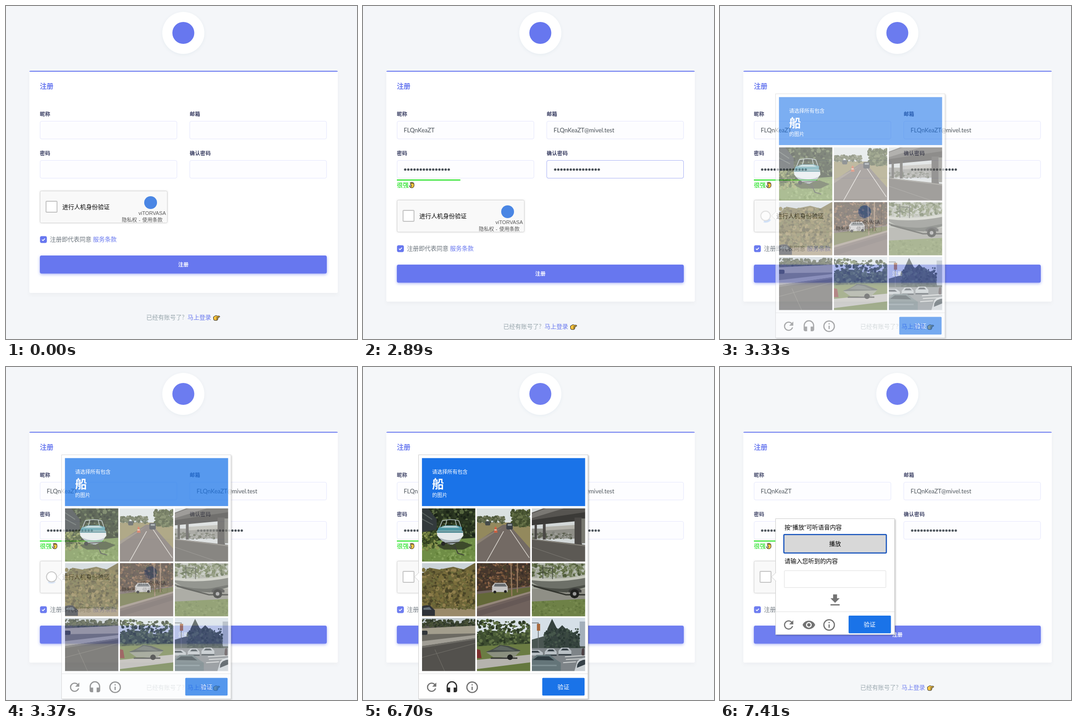
Recreate the animation shown at these times as an HTML page. Size 767x730 px, loop 8000 ms.

```html
<!DOCTYPE html>
<html lang="zh-CN">
<head>
<meta charset="utf-8">
<title>注册</title>
<style>
html, body { margin: 0; width: 100%; height: 100%; overflow: hidden; background: #f4f6f9; }
svg { display: block; }
text { font: 12.95px Lato, "Noto Sans CJK SC", "Noto Sans CJK", sans-serif; fill: #6c757d; white-space: pre; }
.title { font-size: 14.8px; font-weight: 700; fill: #6777ef; }
.label { font-size: 11.1px; font-weight: 700; letter-spacing: .46px; fill: #34395e; }
.value { fill: #495057; }
.small { font: 11.1px "Liberation Sans", "Noto Sans CJK SC", "Noto Sans CJK", sans-serif; fill: #555; }
.link { fill: #6777ef; }
.dark { fill: #000; }
.white { fill: #fff; }
.mid { text-anchor: middle; }
.input { fill: #fdfdff; stroke: #e4e6fc; }
.dots { stroke: #495057; stroke-width: 5.2; stroke-linecap: round; stroke-dasharray: 0 6.8; }
.icon { fill: #737373; }
.blue { fill: #1a73e8; }
.popup { fill: #fff; stroke: #ccc; filter: drop-shadow(2px 2px 1.5px rgba(0,0,0,.2)); }
.hand { fill: #ffc83d; stroke: #111; stroke-width: 1; stroke-linejoin: round; stroke-linecap: round; }
.photo { filter: blur(.5px); }

/* One 8 s cycle: 1 % = 80 ms */
.name, .mail, .pass, .again, .caret, .low, .card, .cover, .phones, .images, .audio {
  animation: 8s step-end infinite;
}
.focus, .box, .spin, .arc, .fade, .leave, .enter { animation: 8s linear infinite; }
.name { animation-name: name; }
.mail { animation-name: mail; }
.pass { animation-name: pass; }
.again { animation-name: again; }
.caret { animation-name: caret; }
.low { animation-name: low; }
.card { animation-name: card; }
.cover { animation-name: cover; }
.phones { animation-name: phones; }
.images { animation-name: images; }
.audio { animation-name: audio; }
.focus { animation-name: focus; }
.box { animation-name: box; transform-origin: 99.5px 440px; }
.spin { animation-name: spin; }
.arc { animation-name: arc; }
.fade { animation-name: fade; }
.leave { animation-name: leave; }
.enter { animation-name: enter; }

@keyframes name { 0% { opacity: 0 } 6.25%, 100% { opacity: 1 } }
@keyframes mail { 0% { opacity: 0 } 7%, 100% { opacity: 1 } }
@keyframes pass { 0% { opacity: 0 } 7.75%, 100% { opacity: 1 } }
@keyframes again { 0% { opacity: 0 } 8.5%, 100% { opacity: 1 } }
@keyframes low { 0% { transform: none } 7.75%, 100% { transform: translateY(20px) } }
@keyframes card { 0% { height: 487px } 7.75%, 100% { height: 506px } }
@keyframes caret {
  0% { opacity: 0 } 8.5% { opacity: 1 } 16.875% { opacity: 0 }
  27.25% { opacity: 1 } 29.375%, 100% { opacity: 0 }
}
@keyframes focus { 0%, 8.5% { opacity: 0 } 11.375%, 36.125% { opacity: 1 } 38.5%, 100% { opacity: 0 } }
@keyframes box {
  0%, 36.125% { transform: none; rx: 1.5px; opacity: 1 }
  37.5% { transform: scale(.7); rx: 12px; opacity: 1 }
  38% { transform: scale(.5); rx: 12px; opacity: 0 }
  41.2% { transform: scale(.8); rx: 12px; opacity: 0 }
  42%, 42.5% { transform: scale(.92); rx: 12px; opacity: 1 }
  44.125%, 100% { transform: none; rx: 1.5px; opacity: 1 }
}
@keyframes spin {
  0%, 37.2% { opacity: 0 } 38%, 39.9% { opacity: 1 }
  40.625% { opacity: .4 } 42.125% { opacity: .2 } 43%, 100% { opacity: 0 }
}
@keyframes arc { 0%, 37.5% { transform: rotate(-60deg) } 44.125%, 100% { transform: rotate(152deg) } }
@keyframes fade { 0%, 39.725% { opacity: 0 } 43.025%, 100% { opacity: 1 } }
@keyframes cover { 0% { opacity: 1 } 41.125%, 100% { opacity: 0 } }
@keyframes phones { 0% { fill: #737373 } 83.75%, 100% { fill: #2b2b2b } }
@keyframes images { 0% { opacity: 1 } 88.125%, 100% { opacity: 0 } }
@keyframes audio { 0% { opacity: 0 } 88.125%, 100% { opacity: 1 } }
@keyframes leave { 0%, 84.625% { opacity: 1 } 88.125%, 100% { opacity: .3 } }
@keyframes enter { 0%, 88.125% { opacity: .2 } 92%, 100% { opacity: 1 } }
</style>
</head>
<body>
<svg width="767" height="730" viewBox="0 0 767 730">
  <defs>
    <path id="refresh" d="M17.65 6.35A7.95 7.95 0 0 0 12 4a8 8 0 1 0 7.73 10h-2.08A6 6 0 1 1 12 6c1.66 0 3.14.69 4.22 1.78L13 11h7V4z"/>
    <path id="phones" d="M12 1a9 9 0 0 0-9 9v7c0 1.66 1.34 3 3 3h3v-8H5v-2a7 7 0 0 1 14 0v2h-4v8h3c1.66 0 3-1.34 3-3v-7a9 9 0 0 0-9-9z"/>
    <path id="info" fill-rule="evenodd" d="M11 7h2v2h-2zM11 11h2v6h-2zM12 2a10 10 0 1 0 0 20a10 10 0 1 0 0-20zM12 4a8 8 0 1 1 0 16a8 8 0 1 1 0-16z"/>
    <path id="eye" fill-rule="evenodd" d="M12 4.5C7 4.5 2.7 7.6 1 12c1.7 4.4 6 7.5 11 7.5s9.3-3.1 11-7.5c-1.7-4.4-6-7.5-11-7.5zM12 7a5 5 0 1 1 0 10a5 5 0 1 1 0-10zM12 9a3 3 0 1 0 0 6a3 3 0 1 0 0-6z"/>
    <path id="load" d="M19 9h-4V3H9v6H5l7 7zM5 18v2h14v-2z"/>
  </defs>

  <rect width="767" height="730" fill="#f4f6f9"/>
  <circle cx="387.5" cy="59" r="46" fill="#fff" style="filter:drop-shadow(0 2px 3px #e6ecf1)"/>
  <circle cx="387.5" cy="59" r="24" fill="#6777ef"/>

  <rect class="card" x="51" y="142" width="674" height="487" rx="3" fill="#fff" style="filter:drop-shadow(0 4px 4px rgba(0,0,0,.03))"/>
  <path d="M51 144a3 2 0 0 1 3-2h668a3 2 0 0 1 3 2z" fill="#6777ef"/>
  <text class="title" x="74" y="181">注册</text>

  <text class="label" x="74" y="240.8">昵称</text>
  <text class="label" x="401.5" y="240.8">邮箱</text>
  <text class="label" x="74" y="326.8">密码</text>
  <text class="label" x="401.5" y="326.8">确认密码</text>
  <g class="input">
    <rect x="74.5" y="252.5" width="299" height="39" rx="3.5"/>
    <rect x="401.5" y="252.5" width="299" height="39" rx="3.5"/>
    <rect x="74.5" y="338.5" width="299" height="39" rx="3.5"/>
    <rect x="401.5" y="338.5" width="299" height="39" rx="3.5"/>
  </g>
  <rect class="focus" x="401.5" y="338.5" width="299" height="39" rx="3.5" fill="none" stroke="#a9b2f5"/>
  <text class="value name" x="89" y="276.5">FLQnKeaZT</text>
  <text class="value mail" x="416.5" y="276.5">FLQnKeaZT@mivel.test</text>
  <g class="pass">
    <path class="dots" d="M92.2 358.5h95.3"/>
    <rect x="74" y="380.5" width="138.75" height="2" fill="#0d0"/>
    <text x="74" y="397.4" style="fill:#0d0">很强</text>
    <g class="hand">
      <path d="M104.5 391l-1.5-3.5q.6-1.5 1.8-.4l1.4 2.4l-.2-3q1-1.5 2 0l.8 3l.4-1.8q1.3-.8 1.7.5l.8 5q-.3 4.5-3.6 5.4q-4.6.6-6.4-2.4z"/>
      <circle cx="104" cy="394.4" r="2" fill="#fff"/>
    </g>
  </g>
  <path class="dots again" d="M420 358.5h95.3"/>
  <rect class="caret" x="517" y="349" width="1" height="17" fill="#495057"/>

  <g class="low">
    <rect x="74.5" y="405.5" width="278" height="70" rx="2.8" fill="#f9f9f9" stroke="#d3d3d3" style="filter:drop-shadow(0 0 2px rgba(0,0,0,.1))"/>
    <g class="spin">
      <g transform="translate(99.5 440)">
        <path class="arc" d="M10.65-7.46A13 13 0 0 1 10.65 7.46" fill="none" stroke="#5a97f2" stroke-width="4"/>
      </g>
    </g>
    <rect class="box" x="87.5" y="428" width="24" height="24" rx="1.5" fill="#fff" stroke="#c1c1c1" stroke-width="2"/>
    <text class="dark" x="123" y="445">进行人机身份验证</text>
    <circle cx="316" cy="431" r="14" fill="#4a86e4"/>
    <text class="small" x="289.5" y="458">viTORVASA</text>
    <text class="small" x="253" y="472.6">隐私权</text>
    <text class="small" x="290" y="472.6">-</text>
    <text class="small" x="297.8" y="472.6">使用条款</text>

    <rect x="74.3" y="504.5" width="15" height="15" rx="3.7" fill="#6777ef"/>
    <path d="M78.6 512.2l2.2 2.2l4.3-4.5" fill="none" stroke="#fff" stroke-width="1.7"/>
    <text x="96" y="516.2">注册即代表同意</text>
    <text class="link" x="190" y="516.2">服务条款</text>

    <rect x="74" y="547" width="627" height="39.5" rx="3.7" fill="#6777ef" style="filter:drop-shadow(0 2px 3px #acb5f6)"/>
    <text class="label mid" x="387.8" y="571.2" style="fill:#fff">注册</text>

    <text x="306.5" y="686.7" style="fill:#98a6ad">已经有账号了?</text>
    <text class="link" x="396.5" y="686.7">马上登录</text>
    <g class="hand">
      <path d="M453.6 681.5l4.2-2.6q2-.8 4 .8h4.6q1.6 1.3 0 2.6h-3.4q1.2 1 .2 2.2q.6 1.4-.6 2.2q0 2-1.6 2.4h-5q-2.4-.2-2.4-2.2z"/>
      <path d="M459.5 682.3h3.4M459.5 684.6h3.4M459.5 686.8h2.8" stroke-width=".7"/>
    </g>
  </g>

  <rect class="fade" width="767" height="730" fill="#fff" fill-opacity=".05"/>

  <g class="fade">
    <g class="images">
      <rect class="popup" x="121.5" y="192.5" width="370" height="535"/>
      <g class="leave">
        <rect class="blue" x="128.8" y="199.7" width="356.6" height="105.2"/>
        <text class="white" x="151" y="233.7" style="font-size:11.1px">请选择所有包含</text>
        <text class="white" x="151" y="265.8" style="font-size:25.9px;font-weight:700">船</text>
        <text class="white" x="151" y="285" style="font-size:11.1px">的图片</text>

        <svg x="129" y="310" width="116.4" height="116.4" viewBox="0 0 116 116"><g class="photo">
          <path d="M-2-2h120v120H-2z" fill="#27321f"/>
          <g data-leaf="3 320 0 0 116 64 5" data-cols="#25301d #3a4a2a #56663f #1a2317 #2e3b24"/>
          <path d="M-2-2h14l20 26v22l-34 6z" fill="#333a3c"/>
          <path d="M-2 8l24 16M-2 22l26 14" stroke="#59625f" stroke-width="2"/>
          <path d="M-2 84l38-14l82-6v54H-2z" fill="#6f8d46"/>
          <g data-leaf="41 140 0 72 116 42 4" data-cols="#7b9a50 #628039 #6f8d46 #86a35a"/>
          <path d="M28 80l60-8l22 8l-20 10H48z" fill="#3d4a2b"/>
          <g data-leaf="8 120 0 52 34 38 5" data-cols="#6f7d3e #47592b #8c9650 #35441f"/>
          <path d="M38 42l6-15q20-5 36 0l5 14M54 25l-4 17M72 25l4 16" fill="none" stroke="#b9c6c4" stroke-width="1.5"/>
          <path d="M36 42l14-5h26l11 4v8H33z" fill="#4f97a3"/>
          <path d="M40 42l10-4h24l8 4z" fill="#b9d3d6"/>
          <path d="M32 49h57l1 10l-9 13l-15 7q-22-3-33-20z" fill="#e3e8ea"/>
          <path d="M32 50h57v3H33z" fill="#3f7f8a"/>
          <path d="M36 63q14 16 30 16l15-7l5-8q-24 12-50-1z" fill="#a9b4ba"/>
          <path d="M48 76l34-2M70 78l8 20l14 4M58 78l18 12" fill="none" stroke="#3c3f38" stroke-width="2"/>
          <circle cx="46" cy="77" r="4.5" fill="#262825"/>
        </g></svg>

        <svg x="249" y="310" width="116.4" height="116.4" viewBox="0 0 116 116"><g class="photo">
          <path d="M-2-2h120v34H-2z" fill="#d9e0e0"/>
          <path d="M-2 31h120v87H-2z" fill="#93895d"/>
          <g data-leaf="5 150 0 18 60 13 4" data-cols="#616a4c #4e583c #747a5c"/>
          <g data-leaf="9 260 76 4 42 34 5" data-cols="#56633b #414c2d #68734a #4b5734"/>
          <path d="M56 36h14l48 54v28H-2V74z" fill="#736a64"/>
          <path d="M57 40L-2 72v8z" fill="#8b8174"/>
          <path d="M58 50L21 116M72 46l42 62" stroke="#d4cfc8" stroke-width="1.6"/>
          <path d="M37 53l2-13h3l3 13z" fill="#cf6242"/>
          <path d="M38 47h5" stroke="#e8d8cd" stroke-width="2"/>
          <rect x="64" y="32" width="14" height="14" rx="3" fill="#3b4046"/>
          <rect x="67" y="34" width="9" height="4" fill="#8d9699"/>
          <rect x="18" y="28" width="11" height="9" rx="2" fill="#454b4b"/>
        </g></svg>

        <svg x="369" y="310" width="116.4" height="116.4" viewBox="0 0 116 116"><g class="photo">
          <path d="M-2-2h120v120H-2z" fill="#d3d8d8"/>
          <path d="M-2 44h120v22H-2z" fill="#8f8f88"/>
          <path d="M30 40l66-4v8l-66 4z" fill="#b3b2aa"/>
          <g data-leaf="6 110 0 54 92 12 4" data-cols="#65685a #82847c #545a49 #9a9b94"/>
          <path d="M-2 10L30-2h88v26L-2 36z" fill="#565450"/>
          <path d="M-2 12L36-2h40L-2 22z" fill="#7a7873"/>
          <path d="M-2 26l120-18v18L-2 37z" fill="#3b3a37"/>
          <path d="M93 20h16v64H93zM24 34h6v34h-6zM6 35h5v32H6z" fill="#4b4946"/>
          <path d="M108 22h10v54h-10z" fill="#77776f"/>
          <path d="M-2 66l120 14v38H-2z" fill="#5c5954"/>
          <path d="M-2 67l120 15" stroke="#85827a" stroke-width="2"/>
          <path d="M-2 84l100 34" stroke="#7b7872"/>
        </g></svg>

        <svg x="129" y="430" width="116.4" height="116.4" viewBox="0 0 116 116"><g class="photo">
          <path d="M-2-2h120v120H-2z" fill="#cbd3d8"/>
          <path d="M-2 26L16 10l22 4l30-6l22 6l28-16v120H-2z" fill="#6d6438"/>
          <g data-leaf="12 520 0 14 116 80 5" data-cols="#7b6f3c #5d5530 #8f7e4c #4a4527 #6c6a3a"/>
          <path d="M-2 101l120-5v22H-2z" fill="#9a8a6a"/>
          <g data-leaf="44 50 30 92 86 8 4" data-cols="#6c6a3a #7b7548 #565430"/>
          <path d="M-2 95q10-5 20-2l10 10v12H-2z" fill="#2f3238"/>
          <path d="M3 98l13-2l5 6H3z" fill="#69727a"/>
        </g></svg>

        <svg x="249" y="430" width="116.4" height="116.4" viewBox="0 0 116 116"><g class="photo">
          <path d="M-2-2h120v120H-2z" fill="#45362c"/>
          <g data-leaf="15 420 0 0 116 58 4" data-cols="#584330 #392e28 #74543a #463f2b #8d664a #4d3c2e"/>
          <path d="M-2 62l120-12v68H-2z" fill="#70625d"/>
          <path d="M-2 68l120-16v9L-2 96z" fill="#636838"/>
          <path d="M-2 95L118 61v4L-2 100z" fill="#95877a"/>
          <path d="M-2 106l120-36v10L-2 118z" fill="#665956"/>
          <path d="M33 50l6-7h23l5 8v12H33z" fill="#c4c3c3"/>
          <path d="M39 45h22l4 6H37z" fill="#666a6e"/>
          <circle cx="39" cy="63" r="3" fill="#222"/><circle cx="62" cy="62" r="3" fill="#222"/>
          <path d="M74-2l2 74M88-2v66" stroke="#977a60" stroke-width="2.5"/>
        </g></svg>

        <svg x="369" y="430" width="116.4" height="116.4" viewBox="0 0 116 116"><g class="photo">
          <path d="M-2-2h120v120H-2z" fill="#a3a79c"/>
          <g data-leaf="18 260 0 0 116 32 5" data-cols="#65724a #8b9476 #4f5c3b #b4baae #737f5c"/>
          <path d="M-2 74l120-8v52H-2z" fill="#6e8147"/>
          <g data-leaf="46 150 0 82 116 32 4" data-cols="#788b50 #62753e #6e8147"/>
          <path d="M-2 56h120v22L-2 84z" fill="#8f8f86"/>
          <path d="M-2 32q60 6 120-4v24l-42 12q-48-2-78-24z" fill="#6d7068"/>
          <path d="M-2 31q60 7 120-5v6Q58 44-2 37z" fill="#c3c5ba"/>
          <path d="M-2 45q40 14 80 10l40-8v5l-42 12q-48-2-78-16z" fill="#4c4f48"/>
          <path d="M4 50l70 19h44" fill="none" stroke="#33352f" stroke-width="3"/>
          <path d="M24 4v30M45 8v27M24 10l21 2" stroke="#464b40" stroke-width="1.5"/>
          <path d="M80 59q14-10 28 0v5H80z" fill="#393a38"/>
          <circle cx="93" cy="67" r="10" fill="#20211f"/><circle cx="93" cy="67" r="4" fill="#999"/>
        </g></svg>

        <svg x="129" y="550" width="116.4" height="116.4" viewBox="0 0 116 116"><g class="photo">
          <path d="M-2-2h120v120H-2z" fill="#53514d"/>
          <path d="M-2-2h120v14H-2z" fill="#c3cbd0"/>
          <g data-leaf="22 260 0 4 116 16 4" data-cols="#3a4330 #4a5339 #2e3728"/>
          <path d="M-2 23l120-6v18L-2 36z" fill="#a39e8d"/>
          <path d="M-2 36l120-2v7L-2 52z" fill="#6c6a62"/>
          <path d="M-2 51L118 37v7L-2 62z" fill="#a19e95"/>
          <path d="M-2 62L118 44v3L-2 66z" fill="#6d6b65"/>
          <path d="M-2 87l120-32M28 69l22 49" stroke="#73716a"/>
          <rect x="-2" y="28" width="14" height="9" rx="3" fill="#33373a"/>
        </g></svg>

        <svg x="249" y="550" width="116.4" height="116.4" viewBox="0 0 116 116"><g class="photo">
          <path d="M-2-2h120v120H-2z" fill="#d9e2e7"/>
          <path d="M-2 36q30-14 60-4t60-6v48H-2z" fill="#3f4f31"/>
          <g data-leaf="27 300 0 6 116 58 5" data-cols="#3d4c30 #4e6139 #2c3925 #627447"/>
          <path d="M-2 62l120-6v62H-2z" fill="#6b7c43"/>
          <path d="M-2 92l120-12v18L-2 116z" fill="#b5b3ad"/>
          <path d="M-2 112l120-15v21H-2z" fill="#65783e"/>
          <path d="M20 74q18-6 30-15l18 2l27 10l-9 8H28z" fill="#454c48"/>
          <path d="M34 70l18-9l14 3l18 8z" fill="#5f6761"/>
          <path d="M20 75l74-2l-13 13H36z" fill="#8b907f"/>
          <path d="M30 88h58" stroke="#383a37" stroke-width="3"/>
          <circle cx="72" cy="86" r="6" fill="#202220"/>
          <path d="M-2 68l9 2l3 18H-2z" fill="#7d302e"/>
        </g></svg>

        <svg x="369" y="550" width="116.4" height="116.4" viewBox="0 0 116 116"><g class="photo">
          <path d="M-2-2h120v120H-2z" fill="#d5dfe7"/>
          <path d="M-2 48l28-8h92v28H-2z" fill="#4a5652"/>
          <path d="M104 8h14v54h-14z" fill="#a3afba"/>
          <path d="M26 66l8-42L44 2l12 24l10-10l12 12l18 6l10 32z" fill="#36433f"/>
          <g data-leaf="31 200 28 24 76 40 4" data-cols="#34433d #46574b #293732 #3c4b42"/>
          <path d="M-2 66h120v52H-2z" fill="#7e8488"/>
          <path d="M-2 11h16v55" fill="none" stroke="#686e70" stroke-width="1.5"/>
          <rect x="11" y="13" width="7" height="15" fill="#a8683c"/>
          <g fill="#b9c0c5">
            <path d="M28 82v-8l6-7h14l6 7v8zM58 81v-9l6-7h16l6 7v9zM-2 82V70h18l8 6v6z"/>
          </g>
          <path d="M33 73l4-4h9l4 4zM63 71l4-4h10l4 4zM-2 72h15l5 4H-2zM29 80h25v3H29zM58 79h28v3H58z" fill="#343e44"/>
          <path d="M72 85l46-3M74 91l44-2M68 98l28-2" stroke="#cfd2d2" stroke-width="2"/>
          <path d="M-2 92l12-11h30l14 11l9 6v20H-2z" fill="#647579"/>
          <path d="M2 92l11-8h24l12 9z" fill="#2f3b41"/>
          <path d="M-2 104h56" stroke="#7f9094" stroke-width="3"/>
          <path d="M92 118l7-23q8-9 19-8v31z" fill="#c9cfd3"/>
          <path d="M99 102q4-10 19-11v10l-20 8z" fill="#354047"/>
          <path d="M108 78l1-9l3-4l2 4v13h-5z" fill="#4a3f42"/>
        </g></svg>

        <rect class="cover" x="128" y="326" width="358" height="342" fill="#fff"/>
        <path d="M122 672.5h369" stroke="#dfdfdf"/>
        <g class="icon">
          <use href="#refresh" transform="translate(134.6 686.6) scale(1.28)"/>
          <use class="phones" href="#phones" transform="translate(178.9 687.5) scale(1.28)"/>
          <use href="#info" transform="translate(223.1 686.6) scale(1.28)"/>
        </g>
        <rect class="blue" x="391.7" y="681.5" width="92.5" height="38.8" rx="1.8"/>
        <text class="white mid" x="438" y="705.8" style="font-weight:500">验证</text>
      </g>
    </g>

    <g class="audio">
      <rect class="popup" x="121.5" y="332.5" width="260" height="254"/>
      <g class="enter">
        <text class="dark" x="141" y="356" style="font-family:'Liberation Sans','Noto Sans CJK SC','Noto Sans CJK',sans-serif">按“播放”可听语音内容</text>
        <rect x="139.5" y="367.2" width="224" height="40.6" rx="2" fill="#d8d8d8" stroke="#1a56bd" stroke-width="2.5"/>
        <text class="dark mid" x="251.5" y="392.4">播放</text>
        <text class="dark" x="141" y="430">请输入您听到的内容</text>
        <rect x="140.5" y="446.5" width="222" height="37" rx="1.5" fill="#fff" stroke="#dfdfdf"/>
        <path d="M122 536.5h259" stroke="#dfdfdf"/>
        <g class="icon">
          <use href="#load" transform="translate(234.3 494.2) scale(1.43)"/>
          <use href="#refresh" transform="translate(134.6 550.1) scale(1.28)"/>
          <use href="#eye" transform="translate(179.2 550.3) scale(1.25)"/>
          <use href="#info" transform="translate(223.1 550.1) scale(1.28)"/>
        </g>
        <rect class="blue" x="281" y="545" width="92.5" height="38.8" rx="1.8"/>
        <text class="white mid" x="327" y="569.3" style="font-weight:500">验证</text>
      </g>
    </g>
    <path d="M122.5 450.5l-10 9.5l10 9.5" fill="#fff" stroke="#ccc"/>
  </g>
</svg>
<script>
// Scatter seeded blobs of foliage over each marked patch.
for (const patch of document.querySelectorAll('[data-leaf]')) {
  let [seed, count, x, y, w, h, size] = patch.dataset.leaf.split(' ').map(Number);
  const cols = patch.dataset.cols.split(' ');
  const rnd = () => (seed = (seed * 16807 + 11) % 2147483647) / 2147483647;
  rnd(); rnd();
  for (let i = 0; i < count; i++) {
    const leaf = document.createElementNS('http://www.w3.org/2000/svg', 'ellipse');
    const r = size * (.3 + rnd() * .5);
    leaf.setAttribute('cx', x + rnd() * w);
    leaf.setAttribute('cy', y + rnd() * h);
    leaf.setAttribute('rx', r);
    leaf.setAttribute('ry', r * (.6 + rnd() * .6));
    leaf.setAttribute('fill', cols[Math.floor(rnd() * cols.length)]);
    patch.append(leaf);
  }
}
</script>
</body>
</html>
```
